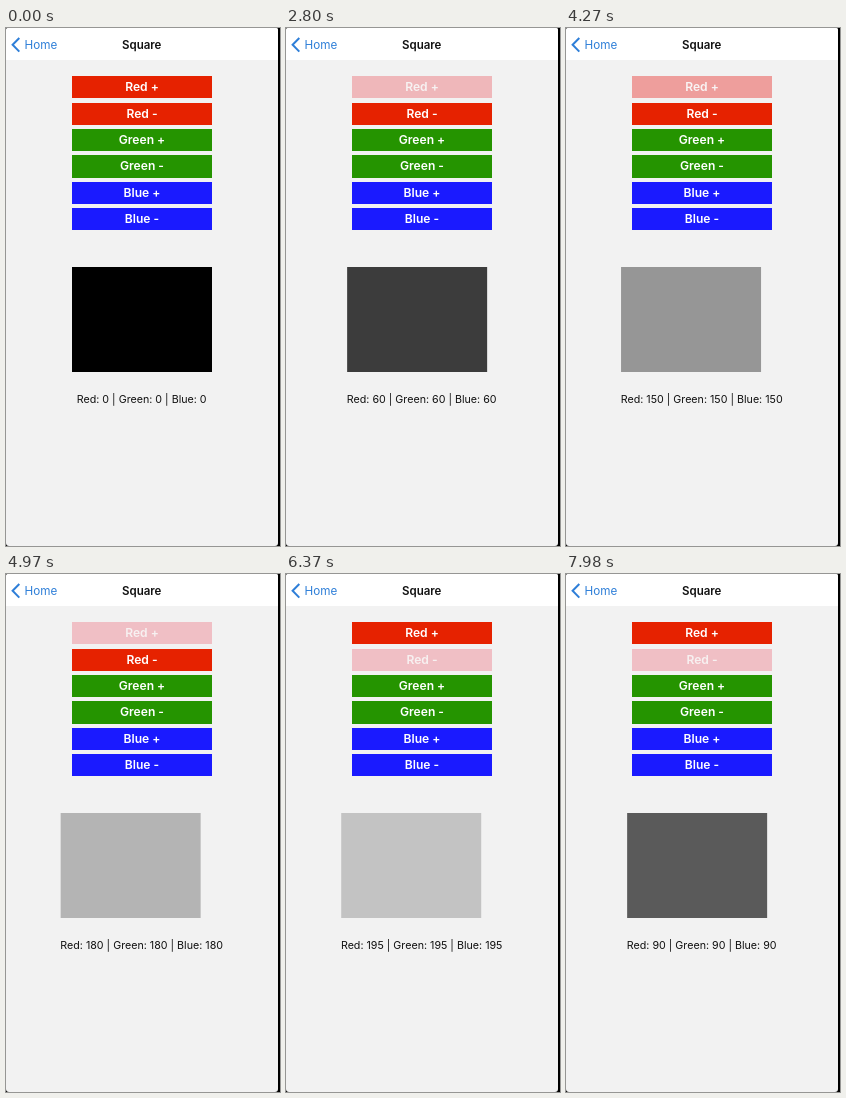
Recreate the animation shown at these times as an HTML page. Size 274 by 518 pixels, loop 8 s.

```html
<!DOCTYPE html>
<html lang="en">
<head>
<meta charset="utf-8">
<title>Square</title>
<style>
  html, body { margin: 0; width: 100%; height: 100%; overflow: hidden; background: #000; }
  #app {
    position: absolute; left: 0; top: 0; width: 272px; height: 518px; overflow: hidden;
    background: #f2f2f2; border-radius: 2px 2px 3px 3px;
    font-family: Inter, Roboto, sans-serif; color: #111;
  }
  header { position: absolute; left: 0; top: 0; width: 100%; height: 32px; background: #fff; }
  header svg { position: absolute; left: 5px; top: 9px; }
  header span { position: absolute; top: 0; line-height: 34px; white-space: nowrap; }
  .back { left: 18.5px; font-size: 11.7px; color: #2f7fd8; }
  .title { left: 135.7px; font-size: 11.5px; font-weight: 600; transform: translateX(-50%); }
  .btn {
    position: absolute; left: 66px; width: 140px; height: 22.3px;
    line-height: 22.6px; text-align: center; font-size: 12.1px; font-weight: 600;
    white-space: pre; color: #fff;
  }
  #panel {
    position: absolute; left: 135.7px; top: 239px; min-width: 140px;
    transform: translateX(-50%);
  }
  #square { width: 140px; height: 105px; }
  #label { margin-top: 19px; line-height: 18px; font-size: 10.7px; text-align: center; white-space: nowrap; }
</style>
</head>
<body>
<div id="app">
  <header>
    <svg width="10" height="16" fill="none" stroke="#2f7fd8" stroke-width="2"><path d="M8.3 1L1.6 7.8L8.3 14.6"/></svg>
    <span class="back">Home</span>
    <span class="title">Square</span>
  </header>
  <div id="panel"><div id="square"></div><div id="label"></div></div>
</div>
<script>
  const LOOP = 8000, STEP = 15, FADE = 250, TAP = 60, LONG_TAP = 130;
  const COLORS = { Red: [230, 34, 0], Green: [37, 148, 0], Blue: [26, 26, 255] };
  const PALE = [240, 191, 197], WHITE = [255, 255, 255], PALE_TEXT = [247, 241, 241];

  const plusTaps = [2030, 2240, 2470, 2700, 2940, 3150, 3430, 3710, 3920, 4130, 4340, 4690, 4970, 5210, 5450];
  const minusTaps = [5880, 6160, 6350, 6530, 6720, 7070, 7350, 7560, 7770, 7975];
  const longTaps = new Set([2240, 2940, 3150, 4340, 4690, 4970, 6160, 6720, 7350, 7560]);

  const app = document.getElementById('app');
  const square = document.getElementById('square');
  const label = document.getElementById('label');

  const buttons = Object.keys(COLORS).flatMap(name => ['+', '-'].map(sign => ({ name, sign })))
    .map(({ name, sign }, i) => {
      const el = document.createElement('div');
      el.className = 'btn';
      el.textContent = `${name} ${sign}`;
      el.style.top = 48.2 + i * 26.35 + 'px';
      el.style.background = `rgb(${COLORS[name]})`;
      app.append(el);
      return el;
    });

  const mix = (a, b, k) => `rgb(${a.map((v, i) => Math.round(v + (b[i] - v) * k))})`;
  const ease = k => k < 0.5 ? 2 * k * k : 1 - 2 * (1 - k) ** 2;
  const releaseOf = tap => tap + (longTaps.has(tap) ? LONG_TAP : TAP);
  const countReleased = (taps, t) => taps.filter(tap => releaseOf(tap) <= t).length;

  // 1 while held, easing back to 0 after the release
  function dimming(taps, t) {
    const last = taps.filter(tap => tap <= t).pop();
    if (last === undefined) return 0;
    const k = (t - releaseOf(last)) / FADE;
    return 1 - ease(Math.min(1, Math.max(0, k)));
  }

  function paintButton(el, taps, t) {
    const k = dimming(taps, t);
    el.style.background = mix(COLORS.Red, PALE, k);
    el.style.color = mix(WHITE, PALE_TEXT, k);
  }

  function draw(t) {
    const v = STEP * (countReleased(plusTaps, t) - countReleased(minusTaps, t));
    square.style.background = `rgb(${v}, ${v}, ${v})`;
    label.textContent = `Red: ${v} | Green: ${v} | Blue: ${v}`;
    paintButton(buttons[0], plusTaps, t);
    paintButton(buttons[1], minusTaps, t);
  }

  const start = performance.now();
  function tick() {
    draw((performance.now() - start) % LOOP);
    requestAnimationFrame(tick);
  }
  tick();
</script>
</body>
</html>
```
